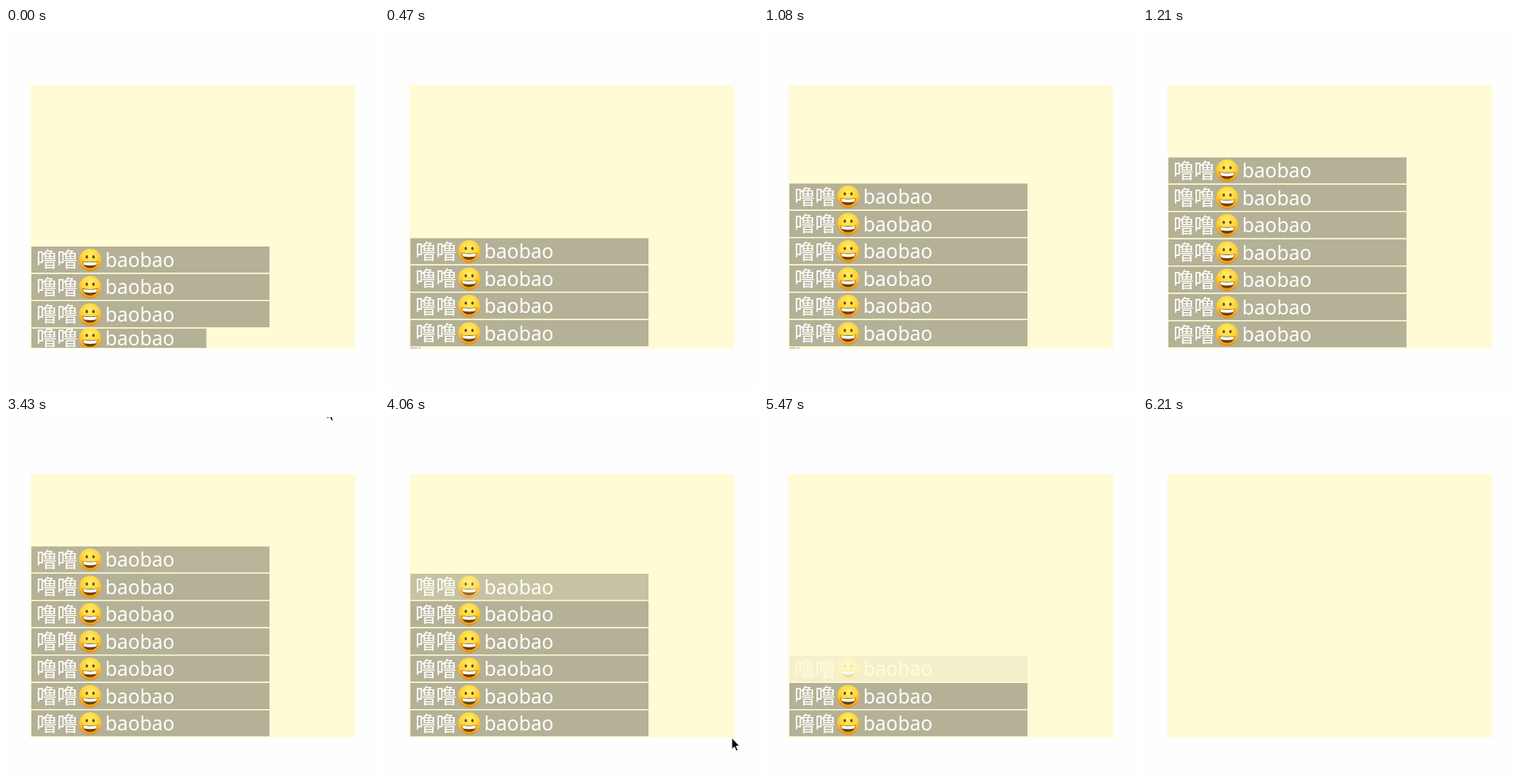
These frames come from a looping animation (470 px wide and 456 px high, 6.69 s). An HTML page:

```html
<!DOCTYPE html>
<html lang="zh">
<head>
<meta charset="utf-8">
<title>Message list</title>
<style>
  html, body { margin: 0; width: 100%; height: 100%; overflow: hidden; background: #fefefe; }
  #stage { display: block; width: 470px; height: 456px; }
  text { fill: #fff; }
  .cjk { font: 26px "Noto Sans CJK SC", "Noto Sans CJK", sans-serif; }
  .latin { font: 24.5px "Noto Sans", sans-serif; }
</style>
</head>
<body>
<svg id="stage" viewBox="0 0 470 456">
  <defs>
    <radialGradient id="skin" cx=".5" cy=".3" r=".72">
      <stop offset="0" stop-color="#fff06a"/>
      <stop offset=".55" stop-color="#fdd23a"/>
      <stop offset=".8" stop-color="#f6ab22"/>
      <stop offset="1" stop-color="#e07f0c"/>
    </radialGradient>
    <g id="face">
      <circle r="14.2" fill="url(#skin)"/>
      <g fill="#6b430c">
        <ellipse cx="-4.2" cy="-3.8" rx="1.5" ry="2.1"/>
        <ellipse cx="4.2" cy="-3.8" rx="1.5" ry="2.1"/>
        <path d="M-9.6 1.6Q0 3.4 9.6 1.6C9.4 7 5.4 10.4 0 10.4S-9.4 7-9.6 1.6Z"/>
      </g>
      <path d="M-8.9 2.2Q0 4 8.9 2.2Q8.7 4.8 7.6 6.2Q0 7.8-7.6 6.2Q-8.7 4.8-8.9 2.2Z" fill="#fff"/>
    </g>
    <rect id="bar" width="300" height="33.3" fill-opacity=".295"/>
    <g id="label">
      <text class="cjk" x="6.3" y="26.2">噜噜</text>
      <use href="#face" x="74" y="17"/>
      <text class="latin" x="93" y="26">baobao</text>
    </g>
    <clipPath id="box"><rect x="31" y="72" width="409" height="333"/></clipPath>
  </defs>
  <rect x="30.7" y="72" width="409.3" height="333" fill="#fffbd5"/>
  <g id="list" clip-path="url(#box)"></g>
  <path id="cursor" d="M0 0V14.5L3.3 11.4L5.5 16.5L7.8 15.5L5.6 10.5H10Z" stroke="#fff" stroke-width="1"/>
</svg>
<script>
  const LOOP = 6690, ROWS = 7, PITCH = 34.5, HEIGHT = 33.3, WIDTH = 300, BOTTOM = 404.8;
  const FADE_START = 3400, FADE_END = 6210;
  // start, end and number of steps for each added row
  const INSERTS = { 4: [450, 580, 6], 5: [820, 930, 5], 6: [1080, 1210, 6] };

  const list = document.getElementById('list');
  const cursor = document.getElementById('cursor');

  function make(parent, tag, attrs) {
    const el = document.createElementNS('http://www.w3.org/2000/svg', tag);
    set(el, attrs);
    return parent.appendChild(el);
  }

  function set(el, attrs) {
    for (const key in attrs) el.setAttribute(key, attrs[key]);
  }

  const rows = Array.from({ length: ROWS }, () => {
    const group = make(list, 'g', {});
    const view = make(group, 'svg', { x: 32, overflow: 'hidden' });
    make(view, 'use', { href: '#bar' });
    const label = make(view, 'use', { href: '#label' });
    return { group, view, label };
  });

  const ease = x => (1 - Math.cos(Math.PI * x)) / 2;
  const clamp = x => Math.min(1, Math.max(0, x));

  function growth(i, t) {
    if (i < 3) return 1;
    if (i === 3) return t < 60 ? 0.735 : 1;
    const [start, end, steps] = INSERTS[i];
    if (t < start) return 0;
    if (t >= end) return 1;
    const step = Math.floor((t - start) / (end - start) * (steps - 1));
    return ease((step + 0.8) / steps);
  }

  function draw(t) {
    // rows fade one after another, gently speeding up
    const faded = ROWS * clamp((t - FADE_START) / (FADE_END - FADE_START)) ** 1.2;
    let y = BOTTOM;
    for (let i = ROWS - 1; i >= 0; i--) {
      const p = growth(i, t), { group, view, label } = rows[i];
      y -= PITCH * p;
      set(view, { y, width: WIDTH * p, height: HEIGHT * p });
      set(label, { y: HEIGHT * (p - 1) / 2 });
      set(group, { opacity: 1 - clamp(faded - i) });
    }
    const m = (t - 3430) / 660;
    set(cursor, {
      visibility: m >= 0 && m < 1.1 ? 'visible' : 'hidden',
      transform: `translate(${404.5 + 34 * m} ${-12.5 + 437 * m})`
    });
  }

  const origin = performance.now();
  function tick() {
    draw((performance.now() - origin) % LOOP);
    requestAnimationFrame(tick);
  }
  tick();
</script>
</body>
</html>
```
